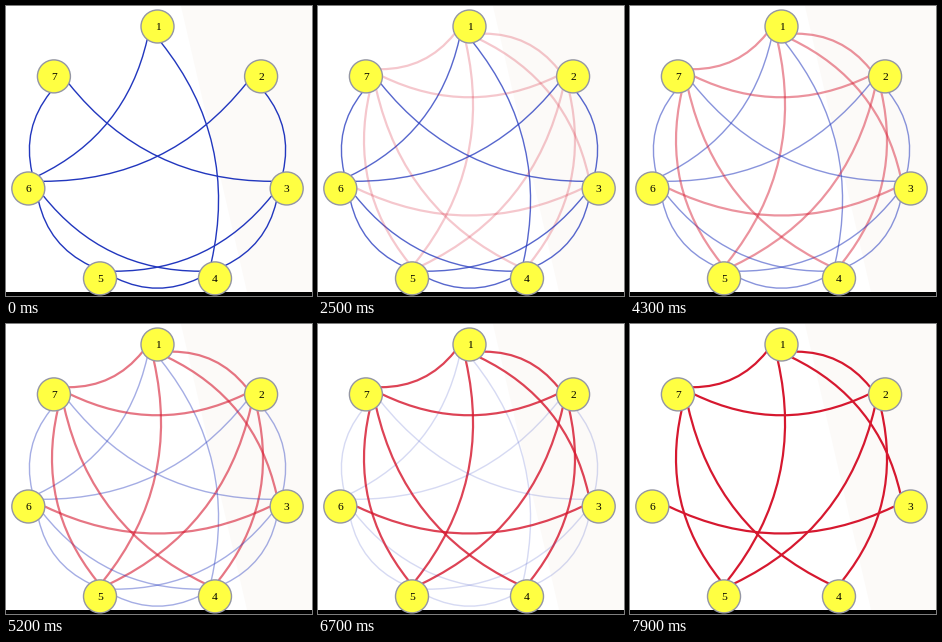
Animation of 306x290 px, one loop 8 s. Source, as a matplotlib script:

```python
from itertools import combinations

import matplotlib.pyplot as plt
import numpy as np
from matplotlib.animation import FuncAnimation
from matplotlib.patches import Circle, PathPatch, Polygon, Rectangle
from matplotlib.path import Path

W, H, DPI = 306, 290, 100
FRAMES, INTERVAL = 80, 100
PX = 72 / DPI

NODES, RING, NODE_R, BEND = 7, 132.5, 16.5, 0.24
CENTER = np.array([151.5, 153.0])
BLUE, RED = "#2237be", "#d6182f"
YELLOW, RIM = "#ffff42", "#9496a4"
GRAPH = "14 16 23 26 34 35 37 45 46 56 67".split()

fig = plt.figure(figsize=(W / DPI, H / DPI), dpi=DPI, facecolor="white")
ax = fig.add_axes([0, 0, 1, 1])
ax.set_xlim(0, W)
ax.set_ylim(H, 0)
ax.axis("off")


def node_pos(n):
    a = 2 * np.pi * (n - 1) / NODES
    return CENTER + RING * np.array([np.sin(a), -np.cos(a)])


def add_edge(i, j, color, width):
    """Curve from node i to node j, bent to the left of its direction."""
    p, q = node_pos(i), node_pos(j)
    u = (q - p) / np.hypot(*(q - p))
    p, q = p + NODE_R * u, q - NODE_R * u
    dx, dy = q - p
    ctrl = (p + q) / 2 + BEND * np.array([dy, -dx])
    path = Path([p, ctrl, q], [Path.MOVETO, Path.CURVE3, Path.CURVE3])
    return ax.add_patch(PathPatch(path, fc="none", ec=color,
                                  lw=width * PX, zorder=2))


# Faint paper tint on the right and the dark strip below
ax.add_patch(Polygon([(175, 0), (242, H), (W, H), (W, 0)],
                     fc="#fcfaf8", ec="none", zorder=0))
ax.add_patch(Rectangle((0, 286), W, 4, fc="black", ec="none", zorder=1))

graph, complement = [], []
for i, j in combinations(range(1, NODES + 1), 2):
    if f"{i}{j}" in GRAPH:
        graph.append(add_edge(i, j, BLUE, 1.4))
    else:
        complement.append(add_edge(i, j, RED, 2.2))

for n in range(1, NODES + 1):
    x, y = node_pos(n)
    ax.add_patch(Circle((x, y), NODE_R, fc=YELLOW, ec=RIM, lw=1.4 * PX, zorder=3))
    ax.text(x, y + 0.3, str(n), family="Liberation Serif", size=11.5 * PX,
            color="black", ha="center", va="center_baseline", zorder=4)


def update(frame):
    fade = (frame / (FRAMES - 1)) ** 1.25
    for edge in graph:
        edge.set_alpha(1 - fade)
    for edge in complement:
        edge.set_alpha(fade)
    return graph + complement


anim = FuncAnimation(fig, update, frames=FRAMES, interval=INTERVAL,
                     repeat=True, repeat_delay=0)
plt.show()
```
